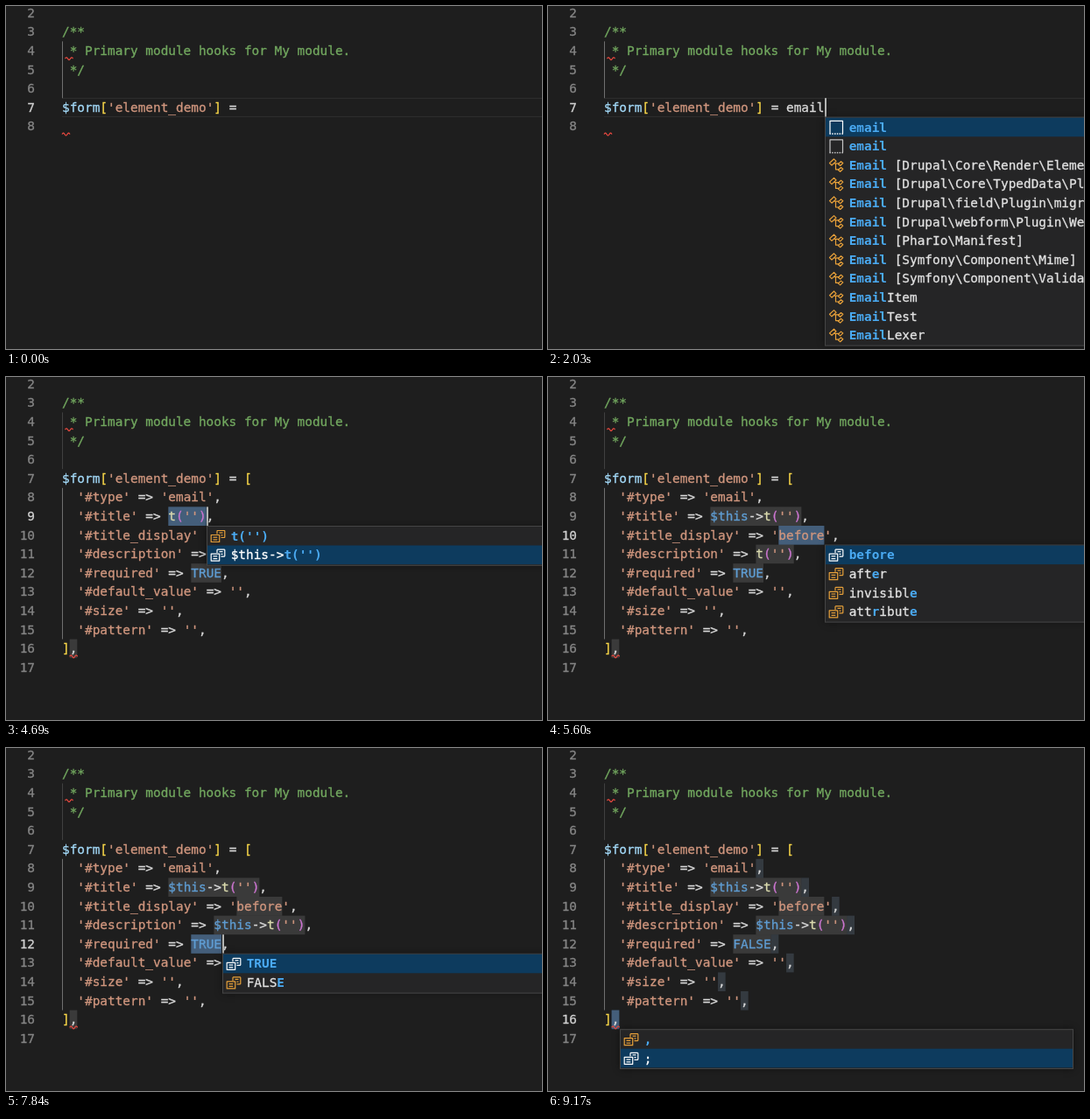
Write an HTML page with a canvas that moves like this. It is 612x392 px and loops after 9.24 s.

```html
<!DOCTYPE html>
<html lang="en">
<head>
<meta charset="utf-8">
<title>Snippet completion</title>
<style>
html, body { margin: 0; width: 100%; height: 100%; overflow: hidden; background: #1e1e1e; }
canvas { display: block; width: 612px; height: 392px; }
</style>
</head>
<body>
<canvas id="stage"></canvas>
<script>
const W = 612, H = 392, LOOP = 9240;
const CHAR = 8.668, ROW = 21.6, LEFT = 64;
const FONT = '"DejaVu Sans Mono", Menlo, monospace';
const WHITE = '#dadada', MATCH = '#4aaaf2', ORANGE = '#e8a13a', PURPLE = '#b180d7';

const canvas = document.getElementById('stage');
const ctx = canvas.getContext('2d');
const scale = window.devicePixelRatio || 1;
canvas.width = W * scale;
canvas.height = H * scale;

// Moments at which the caret flips, starting hidden.
const BLINKS = [420, 910, 1470, 2590, 3080, 3780, 4270, 4760, 5040, 5600,
  6160, 6650, 7000, 7560, 7770, 8330, 8680, 9170];
const KEYS = [1610, 1750, 1890, 1960, 2030];
const EXPAND = 3290, RECHECK = 4060;

const WORDS = [
  ['cube', 'end'], ['cube', 'exp'], ['keyword', 'eval'], ['keyword', 'exit'],
  ['cube', 'exec'], ['keyword', 'empty'], ['cube', 'expm1'], ['cube', 'explode'],
  ['cube', 'extract'], ['cube', 'error_log'], ['cube', 'exitPoint'],
  ['snippet', 'email'], ['snippet', 'email'],
  ['class', 'Email [Drupal\\Core\\Render\\Element]'],
  ['class', 'Email [Drupal\\Core\\TypedData\\Plugin]'],
  ['class', 'Email [Drupal\\field\\Plugin\\migrate]'],
  ['class', 'Email [Drupal\\webform\\Plugin\\WebformElement]'],
  ['class', 'Email [PharIo\\Manifest]'],
  ['class', 'Email [Symfony\\Component\\Mime]'],
  ['class', 'Email [Symfony\\Component\\Validator]'],
  ['class', 'EmailItem'], ['class', 'EmailTest'], ['class', 'EmailLexer']
];

// Tab stops: matched letters stand between asterisks; moves are [time, row].
const CALLS = ["*t('')*", "$this->*t('')*"];
const STOPS = [
  { at: 3290, show: 3360, line: 9, col: 14, items: CALLS, moves: [[4690, 1]] },
  { at: 5040, show: 5110, line: 10, col: 23,
    items: ['*before*', 'aft*e*r', 'invisibl*e*', 'att*r*ibut*e*'], moves: [[6090, 1], [6580, 0]] },
  { at: 7000, show: 7070, line: 11, col: 20, items: CALLS, moves: [[7420, 1]] },
  { at: 7770, show: 7840, line: 12, col: 17, items: ['*TRUE*', 'FALS*E*'], moves: [[8260, 1]] },
  { at: 8680, show: 8680, line: 16, col: 1, items: ['*,*', ';'], moves: [[9100, 1]] }
];

const plain = s => s.replace(/\*/g, '');
const colX = col => LEFT + col * CHAR;
const lineTop = n => 105.2 + (n - 7) * ROW;

function chosen(stop, t) {
  let row = 0;
  for (const [time, next] of stop.moves) if (t >= time) row = next;
  return row;
}

function fill(x, y, w, h, color) {
  ctx.fillStyle = color;
  ctx.fillRect(x, y, w, h);
}

// A hairline stroke gives regular text its slightly heavy weight.
function text(s, x, mid, color, bold = false, size = 14.4) {
  const y = Math.round(mid + 4.7);
  ctx.font = `${bold ? 'bold ' : ''}${size}px ${FONT}`;
  ctx.fillStyle = ctx.strokeStyle = color;
  ctx.lineWidth = 0.3;
  ctx.fillText(s, x, y);
  if (!bold) ctx.strokeText(s, x, y);
}

const RULES = [
  [/^'[^']*'/, '#d0967e'],
  [/^(\$this|TRUE|FALSE)/, '#5f9dd3'],
  [/^\$\w+/, '#a4dbfa'],
  [/^[\[\]]/, '#f9d849'],
  [/^[()]/, '#cc76d1'],
  [/^t(?=\()/, '#dcdcaf'],
  [/^(\w+|\s+|[^\w\s'$()\[\]]+)/, WHITE]
];

function codeLine(n, s) {
  const mid = lineTop(n) + ROW / 2;
  if (n < 6) {
    text(s, LEFT, mid, '#72a85f');
    return;
  }
  let col = 0;
  while (col < s.length) {
    const rest = s.slice(col);
    const [rule, color] = RULES.find(([r]) => r.test(rest));
    const token = rest.match(rule)[0];
    text(token, colX(col), mid, color);
    col += token.length;
  }
}

function highlight(n, col, count, color) {
  fill(colX(col), lineTop(n), count * CHAR, ROW, color);
}

function squiggle(x, n) {
  const y = lineTop(n) + ROW - 1.8;
  ctx.strokeStyle = '#e5483f';
  ctx.lineWidth = 1.2;
  ctx.beginPath();
  for (let i = 0; i <= 9; i += 0.5) {
    ctx.lineTo(x + i, y + 1.4 * Math.cos(i / 9 * Math.PI * 3 + Math.PI / 2));
  }
  ctx.stroke();
}

function path(points, close) {
  ctx.beginPath();
  points.forEach(([x, y]) => ctx.lineTo(x, y));
  if (close) ctx.closePath();
  ctx.stroke();
}

const lozenge = (x, y) =>
  path([[x - 2.8, y + 0.7], [x + 0.3, y - 2.3], [x + 2.6, y - 0.5], [x - 0.5, y + 2.5]], true);

const ICONS = {
  cube: [PURPLE, () => {
    path([[0, -7.5], [6.8, -4.2], [6.8, 4], [0, 7.5], [-6.8, 4], [-6.8, -4.2]], true);
    path([[-6.8, -4.2], [0, -0.8], [6.8, -4.2]]);
    path([[0, -0.8], [0, 7.5]]);
  }],
  keyword: ['#c5c5c5', () => {
    ctx.strokeRect(-7.5, -6.5, 7, 3.5);
    path([[2, -5], [8, -5]]);
    path([[-8, 0], [-1, 0]]);
    path([[2, 0], [5, 0]]);
    path([[-8, 3], [3, 3]]);
    path([[5, 3], [8, 3]]);
    path([[-8, 6.5], [-3, 6.5]]);
    path([[-1, 6.5], [7, 6.5]]);
  }],
  snippet: ['#c5c5c5', () => {
    path([[-7, 7], [-7, -7.5], [7.5, -7.5], [7.5, 7]]);
    for (let x = -7; x < 8; x += 2.8) ctx.fillRect(x - 0.6, 6.5, 1.5, 1.5);
  }],
  class: [ORANGE, () => {
    path([[-7.5, -2.5], [-2.5, -7.2], [0, -4.6], [-5, 0]], true);
    path([[-2.5, -2], [3, -2]]);
    path([[-0.5, -2], [-0.5, 4.8], [3, 4.8]]);
    lozenge(5.2, -2);
    lozenge(5.2, 4.8);
  }],
  choice: [ORANGE, () => {
    path([[-1, -2.5], [-1, -6], [-0.5, -6.5], [7.3, -6.5], [7.8, -6], [7.8, 1], [7.3, 1.5], [3.5, 1.5]]);
    path([[1.5, -4], [5.5, -4]]);
    path([[3.5, -1.2], [5.5, -1.2]]);
    ctx.strokeRect(-7.8, -1.5, 9.5, 8);
    path([[-5.5, 1.2], [-0.7, 1.2]]);
    path([[-5.5, 4], [-0.7, 4]]);
  }]
};

function icon(kind, x, y, lit) {
  const [color, draw] = ICONS[kind];
  ctx.save();
  ctx.translate(x, y);
  ctx.strokeStyle = ctx.fillStyle = lit ? '#ffffff' : color;
  ctx.lineWidth = 1.2;
  ctx.lineJoin = 'round';
  draw();
  ctx.restore();
}

function popup(line, col, rows, active) {
  const x = Math.ceil(colX(col)), y = lineTop(line) + ROW;
  const w = 518, h = rows.length * ROW + 2.6;
  ctx.save();
  ctx.shadowColor = 'rgba(0,0,0,.4)';
  ctx.shadowBlur = 8 * scale;
  fill(x, y, w, h, '#252526');
  ctx.restore();
  ctx.strokeStyle = '#454545';
  ctx.lineWidth = 1;
  ctx.strokeRect(x + 0.5, y + 0.5, w - 1, h - 1);
  fill(x + 1, y + 0.9 + active * ROW, w - 2, ROW, '#0d3b5e');

  rows.forEach(([kind, label], i) => {
    const mid = y + 12 + i * ROW;
    const lit = i === active;
    icon(kind, x + 13, mid, lit);
    let tx = x + 27.7;
    label.split('*').forEach((part, k) => {
      text(part, tx, mid, k % 2 ? MATCH : lit ? '#ffffff' : '#e2e2e2', k % 2 === 1);
      tx += part.length * CHAR;
    });
    if (lit && plain(label) === 'end') text('end(object|array', 550.5, mid, WHITE, false, 12.6);
  });
}

function wordRows(typed) {
  const n = typed.length;
  return WORDS.filter(([, word]) => word.toLowerCase().startsWith(typed))
    .slice(0, 12)
    .map(([kind, word]) => [kind, `*${word.slice(0, n)}*${word.slice(n)}`]);
}

function draw(t) {
  const expanded = t >= EXPAND;
  const typed = 'email'.slice(0, KEYS.filter(k => t >= k).length);
  const index = STOPS.filter(s => t >= s.at).length - 1;
  const stop = STOPS[index];
  const last = index === STOPS.length - 1;
  const values = STOPS.map((s, i) => plain(s.items[i < index ? chosen(s, t) : 0]));
  const line = stop ? stop.line : 7;
  const caret = stop ? stop.col + values[index].length : 24 + typed.length;

  const lines = { 3: '/**', 4: ' * Primary module hooks for My module.', 5: ' */' };
  lines[7] = "$form['element_demo'] = " + (expanded ? '[' : typed);
  if (expanded) {
    const [title, display, description, required, end] = values;
    [
      "type' => 'email'", `title' => ${title}`, `title_display' => '${display}'`,
      `description' => ${description}`, `required' => ${required}`,
      "default_value' => ''", "size' => ''", "pattern' => ''"
    ].forEach((s, i) => { lines[8 + i] = `  '#${s},`; });
    lines[16] = ']' + end;
  }

  ctx.setTransform(scale, 0, 0, scale, 0, 0);
  fill(0, 0, W, H, '#1e1e1e');

  if (!expanded) {
    fill(LEFT, 105, W, 1, '#2d2d2d');
    fill(LEFT, 126, W, 1, '#2d2d2d');
  } else {
    highlight(line, stop.col, values[index].length, '#2c5279');
    STOPS.forEach((s, i) => highlight(s.line, s.col, values[i].length, 'rgba(124,124,124,.3)'));
    if (last) {
      for (let n = 8; n < 16; n++) highlight(n, lines[n].length - 1, 1, 'rgba(173,214,255,.15)');
    }
    fill(LEFT, lineTop(8), 1, 8 * ROW, '#707070');
  }
  fill(LEFT, lineTop(4), 1, 3 * ROW, expanded ? '#404040' : '#707070');

  const count = expanded ? 17 : 8;
  for (let n = 2; n <= count; n++) {
    const label = String(n);
    text(label, 33 - label.length * CHAR, lineTop(n) + ROW / 2, n === line ? '#d0d0d0' : '#858585');
    if (lines[n]) codeLine(n, lines[n]);
  }

  squiggle(67.5, 4);
  if (!expanded) squiggle(LEFT, 8);
  else if (t < RECHECK) squiggle(LEFT, 17);
  else squiggle(colX(1), 16);

  if (BLINKS.filter(b => t >= b).length % 2) {
    fill(Math.ceil(colX(caret)), lineTop(line), 2, ROW, '#b4b5b3');
  }

  if (stop) {
    if (t >= stop.show) popup(line, caret, stop.items.map(s => ['choice', s]), chosen(stop, t));
  } else if (typed) {
    popup(7, caret, wordRows(typed), 0);
  }
}

const start = performance.now();
function tick() {
  draw((performance.now() - start) % LOOP);
  requestAnimationFrame(tick);
}
tick();
</script>
</body>
</html>
```
